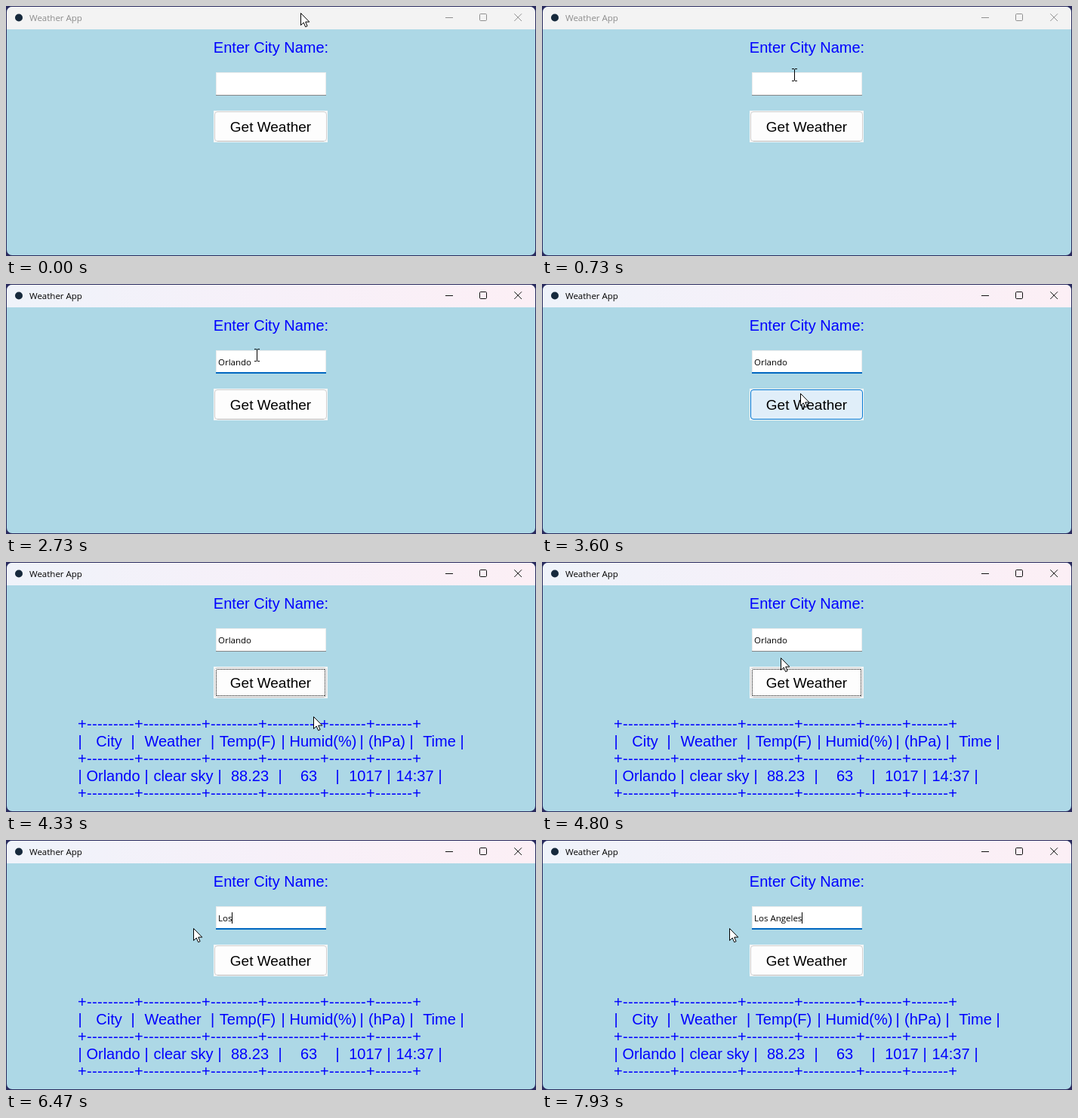
An HTML page that plays this animation: 702x332 px, repeating every 8 s.

```html
<!DOCTYPE html>
<html lang="en">
<head>
<meta charset="utf-8">
<title>Weather App</title>
<style>
  html, body { margin: 0; width: 100%; height: 100%; overflow: hidden; background: #2a2b5e; }
  svg { display: block; }
  text { white-space: pre; }
  .ui { font: 11.5px "Open Sans", "Noto Sans", sans-serif; }
  .big { font: 20px "Liberation Sans", Arial, sans-serif; fill: #00f; text-anchor: middle; }
  .rule { text-anchor: start; letter-spacing: .34px; }
  .caption { font-size: 19px; fill: #000; }
  .crisp { shape-rendering: crispEdges; }
</style>
</head>
<body>
<svg width="702" height="332" viewBox="0 0 702 332">
  <defs>
    <linearGradient id="tint">
      <stop offset="0" stop-color="#eff3fa"/>
      <stop offset=".5" stop-color="#f7f0f9"/>
      <stop offset="1" stop-color="#fceff5"/>
    </linearGradient>
    <clipPath id="frame"><rect x="1" y="1" width="700" height="330" rx="7"/></clipPath>
  </defs>

  <g clip-path="url(#frame)">
    <rect width="702" height="332" fill="#add8e6"/>
    <rect id="bar" width="702" height="31"/>
  </g>
  <circle cx="17" cy="15.5" r="5" fill="#16293c"/>
  <text id="title" class="ui" x="31" y="20">Weather App</text>
  <g id="controls" fill="none">
    <path d="M582 15.5h10"/>
    <rect x="627.5" y="10.5" width="9" height="9" rx="1.2"/>
    <path d="M673.3 10.3l9.7 9.7m0-9.7l-9.7 9.7"/>
  </g>

  <text class="big" x="351" y="62">Enter City Name:</text>

  <g class="crisp">
    <rect x="278" y="88" width="146" height="31" fill="#fff"/>
    <path d="M278.5 118V88.5h145V118" fill="none" stroke="#ececec"/>
    <rect id="underline" x="278" width="146"/>
    <rect id="selection" x="281" y="95" height="17" fill="#0078d7"/>
  </g>
  <text id="entry" class="ui" x="281" y="108"></text>
  <rect id="caret" class="crisp" y="96" width="1" height="15"/>

  <rect x="275" y="139" width="151" height="42" fill="#f7f7f7"/>
  <rect id="button" x="276.5" y="140.5" width="148" height="39" rx="3.5"/>
  <path id="shade" d="M280 179.5h141" stroke="#bababa"/>
  <rect id="ring" class="crisp" x="278.5" y="142.5" width="144" height="35"
        fill="none" stroke="#000" stroke-dasharray="1 1"/>
  <text class="big caption" x="350.5" y="167">Get Weather</text>

  <g id="report"></g>

  <path id="arrow" fill="#fff" stroke="#000" stroke-linejoin="round"
        d="M.5 .5V16.5L4.2 13 6.7 18.7 9.1 17.6 6.7 12.1H11.8Z"/>
  <path id="beam" class="crisp" fill="none" stroke="#000" d="M-3 -7.5H0M1 -7.5H4M.5 -7V8M-3 8.5H0M1 8.5H4"/>
</svg>

<script>
const LOOP = 8000;
const $ = id => document.getElementById(id);
const set = (id, attrs) => {
  for (const name in attrs) $(id).setAttribute(name, attrs[name]);
};
const show = (id, on) => set(id, { visibility: on ? 'visible' : 'hidden' });

// Report table: text centred at each x, pipes between the words.
const addText = (className, x, y, text) => {
  const el = document.createElementNS('http://www.w3.org/2000/svg', 'text');
  el.setAttribute('class', className);
  el.setAttribute('x', x);
  el.setAttribute('y', y);
  el.textContent = text;
  $('report').append(el);
};
const rule = '+' + [9, 11, 9, 10, 7, 7].map(n => '-'.repeat(n) + '+').join('');
[222, 268, 314].forEach(y => addText('big rule', 95, y, rule));
const addRow = (y, words, centres, pipes) => {
  words.forEach((word, i) => addText('big', centres[i], y, word));
  pipes.forEach(x => addText('big', x, y, '|'));
};
addRow(245, ['City', 'Weather', 'Temp(F)', 'Humid(%)', '(hPa)', 'Time'],
  [136.5, 221, 320, 420, 504.5, 574], [98, 168, 273.5, 367, 471, 537, 604]);
addRow(291, ['Orlando', 'clear sky', '88.23', '63', '1017', '14:37'],
  [142, 235, 323, 401, 476.5, 541.5], [98, 186, 283, 363, 439, 507, 575]);

// Pointer stops: time, x, y.
const path = [
  [0, 390, 9], [150, 390, 9], [800, 332, 94], [2700, 332, 94], [3400, 342, 145],
  [3950, 342, 145], [4270, 407, 205], [4370, 407, 205], [4800, 316, 127],
  [5150, 335, 103], [5330, 335, 103], [5750, 248, 117], [LOOP, 248, 117]
];
const pointerAt = t => {
  const i = path.findIndex(p => p[0] > t);
  const [t0, x0, y0] = path[i - 1], [t1, x1, y1] = path[i];
  const k = (t - t0) / (t1 - t0), e = k * k * (3 - 2 * k);
  return [Math.round(x0 + (x1 - x0) * e), Math.round(y0 + (y1 - y0) * e)];
};

// Key press times for each word.
const typing = [
  ['Los Angeles', [6000, 6200, 6400, 6670, 6940, 7130, 7270, 7400, 7530, 7700, 7870]],
  ['Orlando', [1600, 1800, 1940, 2130, 2270, 2400, 2600]]
];
const typedAt = t => {
  const [word, keys] = typing.find(([, k]) => t >= k[0]) || ['', []];
  return word.slice(0, keys.filter(k => k <= t).length);
};

const CLICK = 900, PRESS = 3730, RELEASE = 3830, RESULT = 4200, DRAG = 5310, DROP = 5800, BLINK = 530;
const within = (x, y, l, t, r, b) => x >= l && x < r && y >= t && y < b;

function draw(t) {
  const [x, y] = pointerAt(t);
  const active = t >= CLICK;
  const editing = active && t < PRESS || t >= DRAG;
  const dragging = t >= DRAG && t < DROP;

  set('bar', { fill: active ? 'url(#tint)' : '#f3f3f3' });
  set('title', { fill: active ? '#000' : '#8c8c8c' });
  set('controls', { stroke: active ? '#111' : '#8f8f8f' });

  const entry = $('entry'), text = typedAt(t);
  if (entry.textContent !== text) entry.textContent = text;
  const width = text ? entry.getComputedTextLength() : 0;
  const selected = t >= DRAG && t < typing[0][1][0];
  const from = selected ? Math.min(width, Math.max(0, x - 281)) : width;
  set('selection', { x: 281 + from, width: width - from });
  set('entry', { fill: selected && from < width / 2 ? '#fff' : '#000' });
  set('underline', editing ? { y: 117, height: 2, fill: '#0067c0' } : { y: 118, height: 1, fill: '#868686' });
  const phase = (t - (t < DRAG ? CLICK : DRAG)) % (2 * BLINK);
  set('caret', { x: Math.round(281 + from) });
  show('caret', editing && phase < BLINK);

  const hover = within(x, y, 275, 139, 426, 181);
  const pressed = t >= PRESS && t < RELEASE;
  set('button', {
    fill: pressed ? '#cce4f7' : hover ? '#e0eef9' : '#fdfdfd',
    stroke: pressed ? '#005499' : hover ? '#0078d4' : '#d0d0d0'
  });
  show('shade', !hover);
  show('ring', t >= PRESS && t < DRAG);
  show('report', t >= RESULT);

  const overEntry = dragging || within(x, y, 278, 88, 424, 119) && t < DROP;
  show('beam', overEntry);
  show('arrow', !overEntry);
  set(overEntry ? 'beam' : 'arrow', { transform: `translate(${x} ${y})` });
}

function tick() {
  draw(performance.now() % LOOP);
  requestAnimationFrame(tick);
}
tick();
</script>
</body>
</html>
```
